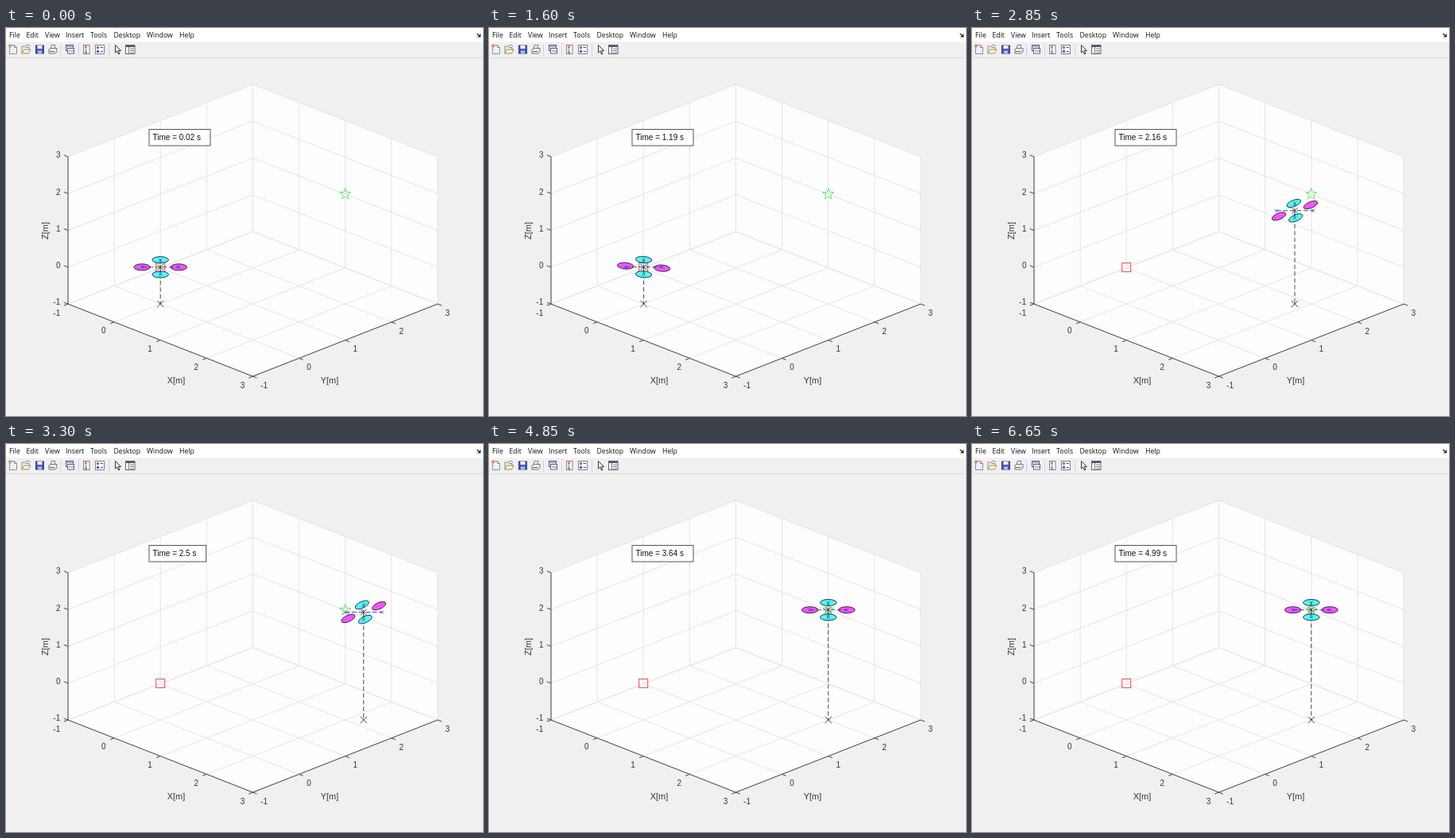
These frames come from a looping animation (600 px wide and 488 px high, 6.95 s). An HTML page:

```html
<!DOCTYPE html>
<html lang="en">
<head>
<meta charset="utf-8">
<title>Quadrotor flight</title>
<style>
html, body { margin: 0; width: 100%; height: 100%; overflow: hidden; background: #f0f0f1; }
svg { display: block; width: 600px; height: 488px; }
text { font-family: "Liberation Sans", Arial, sans-serif; font-size: 10px; fill: #333; }
.menu { font-family: "Open Sans", "Noto Sans", sans-serif; font-size: 8.7px; fill: #111; }
.label { font-size: 11px; }
.mid { text-anchor: middle; }
.grid { stroke: #e4e4e5; }
.axis { stroke: #444; }
path, line { fill: none; }
</style>
</head>
<body>
<svg viewBox="0 0 600 488">
  <rect width="600" height="488" fill="#f0f0f1"/>
  <rect width="600" height="17.5" fill="#fff"/>
  <path d="M0 37.5H600" stroke="#dcdcdd"/>
  <path d="M.5 38V488" stroke="#fafafa"/>
  <g id="menu"></g>
  <path d="M592.5 7L596 10.5M596.5 7.5V11H593" stroke="#222" stroke-width="1.2"/>
  <g id="toolbar" stroke-width=".9">
    <path d="M68.5 20V35M91.5 20V35M129.5 20V35" stroke="#d2d2d4"/>
    <path d="M4.500 21.500H10.500L13.500 24.500V32.500H4.500Z" fill="#fff" stroke="#75879b"/>
    <path d="M10.500 21.500V24.500H13.500" stroke="#75879b"/>
    <circle cx="5" cy="22.500" r="2" fill="#e88952"/>
    <path d="M20 32V23H24L25 24.500H29V27" fill="#f4d36b" stroke="#a58531"/>
    <path d="M20 32L22.500 27H31L28.500 32Z" fill="#ffe78e" stroke="#a58531"/>
    <path d="M25 22Q28 20 30 23" stroke="#5577a8"/>
    <rect x="37.500" y="22" width="10" height="10" fill="#4d57b2" stroke="#293579"/>
    <rect x="39.500" y="22" width="6" height="4" fill="#eef"/>
    <rect x="40" y="28.500" width="5" height="3.500" fill="#b7bdd9"/>
    <path d="M56 26L57 21.500H62L61 26" fill="#fff" stroke="#777"/>
    <path d="M54 27L56 25.500H64V30L62 32H54Z" fill="#c5c5ca" stroke="#666"/>
    <path d="M55 29.500H61.500" stroke="#555"/>
    <rect x="75.500" y="21.500" width="9" height="7" fill="#dce7f5" stroke="#48566e"/>
    <path d="M76 23H84" stroke="#55739f"/>
    <rect x="77.500" y="25.500" width="8" height="6.500" fill="#fff" stroke="#48566e"/>
    <path d="M79 30Q80 27 82 29T85 28" stroke="#456fac"/>
    <rect x="97.500" y="21.500" width="7.500" height="11" fill="#fff" stroke="#65758e"/>
    <rect x="99" y="22.500" width="3" height="3" fill="#df7963"/>
    <rect x="99" y="25.500" width="3" height="3" fill="#e9cf62"/>
    <rect x="99" y="28.500" width="3" height="3.500" fill="#5ab4dc"/>
    <rect x="112.500" y="21.500" width="11" height="11" fill="#fff" stroke="#65758e"/>
    <rect x="114" y="23" width="3" height="3" fill="#d55a62"/>
    <rect x="114" y="28" width="3" height="3" fill="#505fc6"/>
    <path d="M118.500 24.500H122M118.500 29.500H122" stroke="#444"/>
    <path d="M137.500 21.500V31L139.700 29L141.500 33L143 32.300L141.300 28.500H144.500Z" fill="#fff" stroke="#222"/>
    <rect x="150.500" y="21.500" width="11.500" height="11" fill="#fff" stroke="#4d5870"/>
    <path d="M151 23H162" stroke="#4d5870" stroke-width="2"/>
    <path d="M154.500 24V32M156 26H161M156 28.500H161M156 31H161" stroke="#666"/>
  </g>
  <polygon points="78,162 310.500,71 543,162 543,347 310.500,437.500 78,347" fill="#fdfdfe"/>
  <g id="plot"></g>
  <rect id="box" x="180" y="127.500" height="20.500" fill="#fff" stroke="#444" stroke-width=".9"/>
  <text id="clock" x="184.500" y="141.300" style="fill:#111"></text>
  <rect x="188.700" y="295.600" width="11" height="11" fill="none" stroke="#e8484e"/>
  <path id="star" stroke="#55e855" stroke-width=".9"/>
  <g id="drone" stroke-width=".9"></g>
</svg>
<script>
const byId = id => document.getElementById(id);
const make = (parent, tag, attrs, content = "") => {
  const el = document.createElementNS("http://www.w3.org/2000/svg", tag);
  for (const name in attrs) el.setAttribute(name, attrs[name]);
  el.textContent = content;
  return parent.appendChild(el);
};
const set = (el, attrs) => { for (const name in attrs) el.setAttribute(name, attrs[name]); };
const plot = byId("plot");
const project = (x, y, z) => [194.25 + 58.12 * (x + y), 300.8 + 22.75 * (x - y) - 46.3 * z];

function segment(a, b, cls) {
  const [x1, y1] = project(...a), [x2, y2] = project(...b);
  make(plot, "line", { x1, y1, x2, y2, class: cls });
}

function label(x, y, content, extra = {}) {
  make(plot, "text", { x, y: y + 3.6, class: "mid", ...extra }, content);
}

function tick([x, y], dx, dy) {
  make(plot, "line", { x1: x, y1: y, x2: x + dx, y2: y + dy, class: "axis" });
}

for (let v = -1; v <= 3; v++) {
  segment([v, -1, -1], [v, 3, -1], "grid");
  segment([-1, v, -1], [3, v, -1], "grid");
  segment([-1, v, -1], [-1, v, 3], "grid");
  segment([v, 3, -1], [v, 3, 3], "grid");
  segment([-1, -1, v], [-1, 3, v], "grid");
  segment([-1, 3, v], [3, 3, v], "grid");
}
segment([-1, -1, -1], [-1, -1, 3], "axis");
segment([-1, -1, -1], [3, -1, -1], "axis");
segment([3, -1, -1], [3, 3, -1], "axis");
for (let v = -1; v <= 3; v++) {
  const i = v + 1;
  tick(project(-1, -1, v), -5.2, -2);
  tick(project(v, -1, -1), -5.2, 2);
  tick(project(3, v, -1), 5.2, 2);
  label(v < 0 ? 63.8 : 65.8, 344.5 - 46.2 * i, v);
  label(v < 0 ? 63.8 : 64.7 + 58.2 * i, 358 + 22.8 * i, v);
  label(v < 0 ? 324.5 : 323 + 58.1 * i, 449.3 - 22.8 * i, v);
}
label(214, 443, "X[m]", { class: "mid label" });
label(407, 443, "Y[m]", { class: "mid label" });
label(0, 0, "Z[m]", { class: "mid label", transform: "translate(49.5 255) rotate(-90)" });

[["File", 4], ["Edit", 25.5], ["View", 49], ["Insert", 75], ["Tools", 106],
 ["Desktop", 135.5], ["Window", 177], ["Help", 218]]
  .forEach(([name, x]) => make(byId("menu"), "text", { x, y: 12, class: "menu" }, name));

const starPoints = Array.from({ length: 10 }, (_, i) => {
  const r = i % 2 ? 2.9 : 7.5, a = i * Math.PI / 5;
  return [426.8 + r * Math.sin(a), 208.9 - r * Math.cos(a)];
});
byId("star").setAttribute("d", "M" + starPoints.join("L") + "Z");

const drone = byId("drone");
const height = make(drone, "line", { stroke: "#333", "stroke-dasharray": "5.5 3" });
const ground = make(drone, "path", { stroke: "#333" });
const rotors = [[1, 0], [-1, 0], [0, 1], [0, -1]].map(([along, across]) => ({
  along, across,
  el: make(drone, "circle", {
    r: 1, fill: along ? "#f055f8" : "#50f8fa", stroke: "#222", "vector-effect": "non-scaling-stroke"
  })
}));
const sideArms = make(drone, "path", { stroke: "#333a80", "stroke-dasharray": "6 2.500" });
const crossArms = make(drone, "path", { stroke: "#334", "stroke-dasharray": "4 2.500" });
const sideMarks = make(drone, "path", { stroke: "#4038d0", "stroke-width": .8 });
const crossMarks = make(drone, "path", { stroke: "#235880", "stroke-width": .8 });
const hub = make(drone, "path", { stroke: "#333" });

// Each curve is a list of [seconds, value] knots.
const clockKnots = [[0, .02], [1.6, 1.19], [2.45, 1.86], [3.3, 2.5], [4.15, 3.11], [5.7, 4.28], [6.65, 4.99]];
const xKnots = [[0, 194.2], [1.4, 194.2], [1.6, 194.6], [1.85, 202], [2.1, 229], [2.45, 313], [2.8, 397],
  [3.05, 434], [3.3, 449.8], [3.5, 447.5], [3.8, 435], [4.15, 426.3], [4.65, 426.8]];
const yKnots = [[0, 300.8], [1.6, 300.6], [1.85, 299], [2.1, 291.5], [2.45, 263], [2.8, 233],
  [3.05, 219], [3.3, 211.5], [3.7, 208.6], [4.15, 208.8], [4.65, 208.7]];
const tiltKnots = [[0, 0], [.7, .4], [1.2, 2], [1.6, 6.5], [2.1, 33], [2.45, 10.5], [2.95, -34],
  [3.3, -33], [3.65, -8], [4.15, 5], [4.6, 0]];
const yawKnots = [[0, 0], [2.1, 0], [2.45, .8], [3.3, 5], [4.15, 0]];

const slope = (a, b) => (b[1] - a[1]) / (b[0] - a[0]);

function locate(knots, t) {
  const next = knots.findIndex(k => k[0] > t);
  return next < 0 ? knots.length - 1 : Math.max(0, next - 1);
}

function linear(knots, t) {
  const i = locate(knots, t), a = knots[i], b = knots[i + 1];
  return b ? a[1] + slope(a, b) * (t - a[0]) : a[1];
}

function tangent(knots, i) {
  if (!i || i === knots.length - 1) return 0;
  const before = slope(knots[i - 1], knots[i]), after = slope(knots[i], knots[i + 1]);
  return before * after > 0 ? 2 * before * after / (before + after) : 0;
}

function smooth(knots, t) {
  const i = locate(knots, t), a = knots[i], b = knots[i + 1];
  if (!b) return a[1];
  const span = b[0] - a[0], u = (t - a[0]) / span, w = 1 - u;
  return a[1] * w * w * (1 + 2 * u) + b[1] * u * u * (3 - 2 * u)
    + span * u * w * (tangent(knots, i) * w - tangent(knots, i + 1) * u);
}

const cross = (x, y, r) => `M${x - r} ${y - r}L${x + r} ${y + r}M${x - r} ${y + r}L${x + r} ${y - r}`;

function render(t) {
  const value = String(+linear(clockKnots, t).toFixed(2));
  byId("clock").textContent = `Time = ${value} s`;
  byId("box").setAttribute("width", 77 - 5.3 * (4 - value.length));

  const x = smooth(xKnots, t), y = smooth(yKnots, t);
  const tilt = smooth(tiltKnots, t) * Math.PI / 180, yaw = smooth(yawKnots, t) * Math.PI / 180;
  const armX = 23.2, armY = 9.2, blade = .44;
  const forward = [armX * Math.cos(tilt) * Math.cos(yaw), 13.1 * Math.sin(tilt) - armY * Math.sin(yaw)];
  const side = [armX * Math.sin(yaw), armY * Math.cos(yaw)];

  for (const { along, across, el } of rotors) {
    const cx = x + along * forward[0] + across * side[0];
    const cy = y + along * forward[1] + across * side[1];
    const axes = [...forward, ...side].map(v => v * blade);
    el.setAttribute("transform", `matrix(${[...axes, cx, cy]})`);
  }
  set(height, { x1: x, y1: y, x2: x, y2: 347 });
  set(ground, { d: cross(x, 347, 4.2) });
  set(sideArms, { d: `M${x - armX} ${y}H${x + armX}` });
  set(crossArms, { d: `M${x} ${y - armY}V${y + armY}` });
  set(sideMarks, { d: cross(x - armX, y, 2) + cross(x + armX, y, 2) });
  set(crossMarks, { d: cross(x, y - armY, 2) + cross(x, y + armY, 2) });
  set(hub, { d: cross(x, y, 3.8) });
}

const loop = 6950, step = 50, start = performance.now();
function frame() {
  const elapsed = (performance.now() - start) % loop;
  render(Math.min(6650, Math.floor(elapsed / step) * step) / 1000);
  requestAnimationFrame(frame);
}
frame();
</script>
</body>
</html>
```
